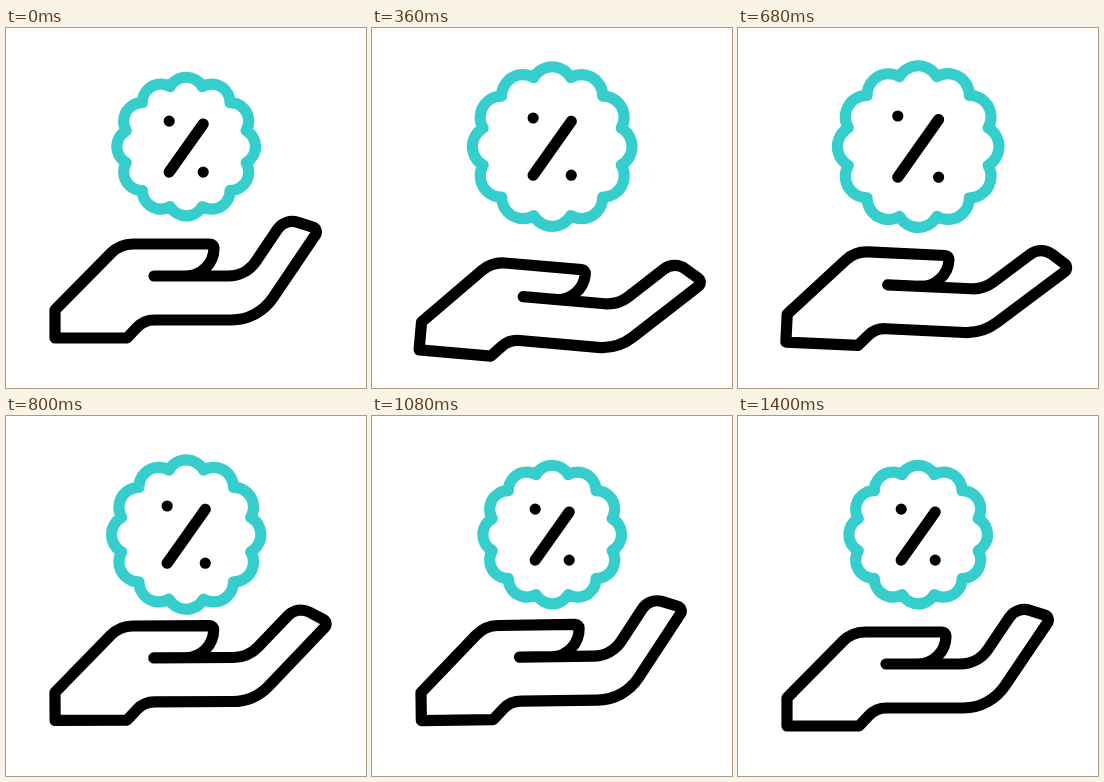
These frames come from a looping animation (360 by 360 pixels, 1.44 s). An HTML page with a canvas:

```html
<!DOCTYPE html>
<html lang="en">
<head>
<meta charset="utf-8">
<title>Discount in hand</title>
<style>
  html, body { margin: 0; height: 100%; overflow: hidden; background: #fff; }
  canvas { display: block; width: 100vw; height: 100vh; }
</style>
</head>
<body>
<canvas width="360" height="360"></canvas>
<script>
const LOOP = 1440, STEP = 40;
const RAD = Math.PI / 180;
const ctx = document.querySelector('canvas').getContext('2d');
ctx.lineCap = ctx.lineJoin = 'round';

function ease(t, start, end) {
  const u = Math.min(1, Math.max(0, (t - start) / (end - start)));
  return u * u * (3 - 2 * u);
}

// Rises from 0 to 1, holds, then falls back to 0.
const swell = (t, rise, top, fall, end) => ease(t, rise, top) - ease(t, fall, end);

function stroke(color, width, trace) {
  ctx.beginPath();
  trace();
  ctx.strokeStyle = color;
  ctx.lineWidth = width;
  ctx.stroke();
}

function drawRing(scale) {
  stroke('#36cdcd', 11.2, () => {
    for (let i = 0; i < 12; i++) {
      const a = i * 30 * RAD, r = 50.8 * scale;
      ctx.arc(r * Math.cos(a), r * Math.sin(a), 18.5 * scale, a - 60.4 * RAD, a + 60.4 * RAD);
    }
    ctx.closePath();
  });
}

function drawPercent(scale) {
  const x = 17 * scale, y = 25.5 * scale;
  stroke('#000', 11.2, () => {
    ctx.moveTo(x, y - 48 * scale);
    ctx.lineTo(-x, y);
    for (const side of [-1, 1]) {
      ctx.moveTo(side * x, side * y);
      ctx.lineTo(side * x + 0.01, side * y);
    }
  });
}

// The fingers are a straight strip, turned about the knuckle and joined to the palm.
function drawHand(bend) {
  const knuckle = { x: 248, y: 267 }, half = 17.3;
  const slope = (56 - bend) * RAD, c = Math.cos(slope), s = Math.sin(slope);
  const corner = (x, y, r) => ctx.arcTo(last[0], last[1], ...(last = [x, y]), r);
  const tip = (along, across) => [knuckle.x + along * c + across * s, knuckle.y - along * s + across * c];
  const meet = (y, across) => [knuckle.x + (across - (y - knuckle.y) * c) / s, y];

  const outline = [
    [...meet(248, -half), 34], [...tip(81, -half), 18], [...tip(91, half), 5], [...meet(292, half), 50],
    [138, 292, 24], [121, 310, 0], [49, 310, 0], [49, 282, 0],
    [114, 216, 31], [208, 216, 4], [208, 248, 28], [180, 248, 0],
  ];
  stroke('#000', 11.2, () => {
    ctx.moveTo(148, 248);
    outline.forEach(([x, y, radius], i) => {
      const next = outline[i + 1];
      if (radius && next) ctx.arcTo(x, y, next[0], next[1], radius);
      else ctx.lineTo(x, y);
    });
  });
}

function draw(t) {
  const push = swell(t, 0, 470, 505, 885);
  const rebound = swell(t, 505, 885, 900, 1350);
  const tilt = 5.8 * push - 1.2 * rebound;

  ctx.clearRect(0, 0, 360, 360);
  ctx.save();
  ctx.translate(180.2, 118.6);
  drawRing(1 + 0.2 * swell(t, 0, 530, 580, 960));
  drawPercent(1 + 0.21 * swell(t, 80, 588, 630, 1010));
  ctx.restore();

  ctx.save();
  ctx.translate(148 + tilt * 0.63, 248 + 24 * push - 10.5 * rebound);
  ctx.rotate(tilt * RAD);
  ctx.translate(-148, -248);
  drawHand(17 * swell(t, 0, 520, 642, 1000));
  ctx.restore();
}

function tick() {
  draw(Math.floor(performance.now() % LOOP / STEP) * STEP);
  requestAnimationFrame(tick);
}
tick();
</script>
</body>
</html>
```
